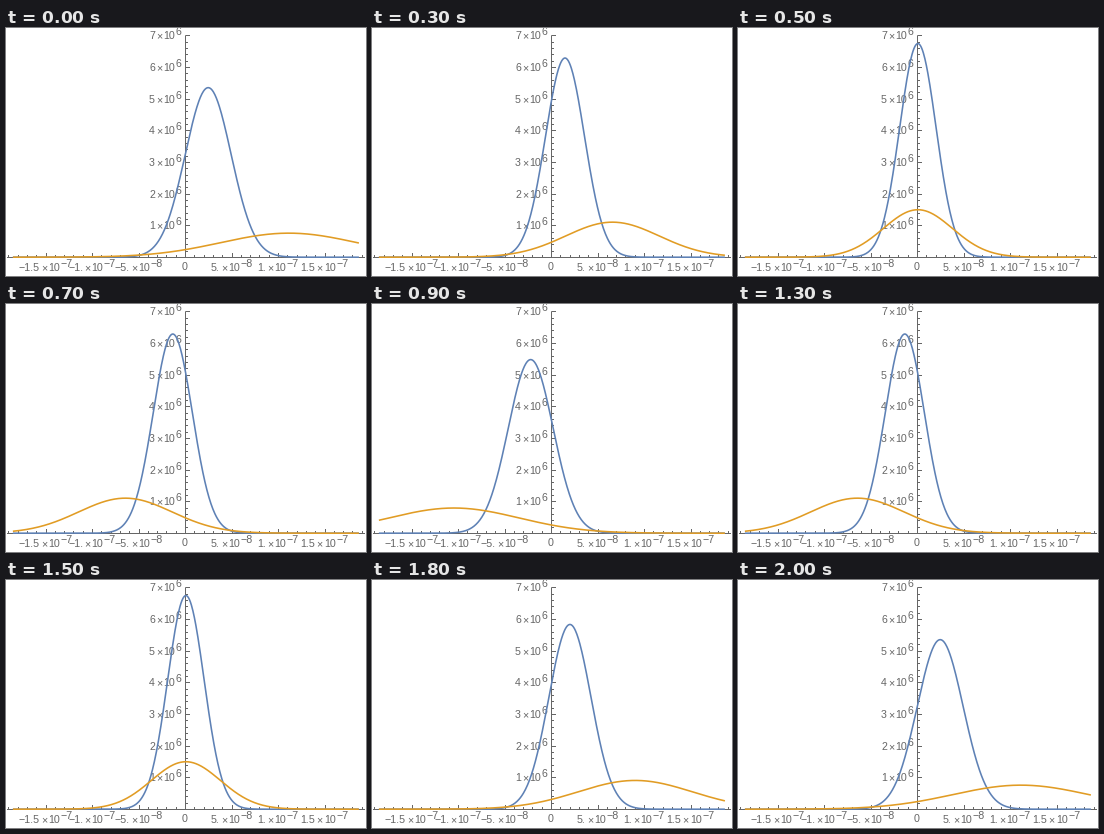
These frames come from a looping animation (360 by 248 pixels, 2.1 s). A matplotlib script:

```python
import numpy as np
import matplotlib.pyplot as plt
from matplotlib.animation import FuncAnimation

W, H, DPI = 360, 248, 100
PX = 72 / DPI                      # one pixel in points
X0, Y0 = 179.5, 229.5              # axis crossing in pixels
SX, SY = 9.3, 31.65                # pixels per 1e-8 and per 1e6
GRAY, BLUE, ORANGE = "#666666", "#5e81b5", "#e19c24"
STEPS = 20                         # steps per oscillation; both ends are shown
FONT = 10.67

fig = plt.figure(figsize=(W / DPI, H / DPI), dpi=DPI, facecolor="white")
ax = fig.add_axes([0, 0, 1, 1])
ax.set(xlim=(0, W), ylim=(H, 0))
ax.axis("off")


def line(xs, ys):
    ax.plot(xs, ys, color=GRAY, lw=PX, solid_capstyle="butt", snap=False,
            zorder=1)


def advance(s):
    em = {".": 0.278, "\u2212": 0.584, "\u00d7": 0.584}
    return FONT * sum(em.get(c, 0.556) for c in s)


def text(x, y, s):
    ax.text(x, y, s, family="Liberation Sans", size=FONT * PX, color=GRAY,
            ha="left", va="baseline", zorder=1)


def label(x, base, mantissa, power, align):
    """Scientific notation, placed by its centre (0.5) or right end (1)."""
    parts = [(mantissa, 1.2, 0), ("\u00d7", 1, 0), ("10", 0.3, 0), (power, 0, -4)]
    x -= align * sum(advance(s) + gap for s, gap, _ in parts)
    for s, gap, rise in parts:
        text(x, base + rise, s)
        x += advance(s) + gap


def draw_axes():
    line([1, 359], [Y0, Y0])
    line([X0, X0], [7.5, Y0])
    for k in range(-19, 20):
        x = np.floor(X0 + k * SX) + 0.5
        line([x, x], [Y0, Y0 - (4.5 if k % 5 == 0 else 2.5)])
    for k in range(1, 36):
        y = np.floor(Y0 - k * SY / 5) + 0.5
        line([X0, X0 + (4.5 if k % 5 == 0 else 2.5)], [y, y])
    for k in range(1, 8):
        label(175.5, np.round(Y0 - k * SY + 3.5), str(k), "6", 1)
    for mantissa, power, k in (("1.5", "7", 15), ("1.", "7", 10), ("5.", "8", 5)):
        label(X0 - 0.5 + k * SX, 243, mantissa, "\u2212" + power, 0.5)
        label(X0 - 0.5 - k * SX, 243, "\u2212" + mantissa, "\u2212" + power, 0.5)
    text(X0 - 0.5 - advance("0") / 2, 242, "0")


def packet(x, c, peak, width, swing, spread, power):
    """Swinging Gaussian of constant area that widens away from the centre."""
    grow = 1 + spread * abs(c) ** power
    return peak / grow * np.exp(-((x - swing * c) / (width * grow)) ** 2 / 2)


draw_axes()
xs = np.linspace(-173, 173, 693)
WAVES = ((BLUE, (6.75, 18.2, 22.3, 0.26, 2.4)),
         (ORANGE, (1.5, 34.5, 103, 0.974, 1.9)))
curves = [ax.plot([], [], color=color, lw=1.6 * PX, solid_capstyle="butt",
                  zorder=2)[0] for color, _ in WAVES]


def update(i):
    c = np.cos(2 * np.pi * i / STEPS)
    for curve, (_, shape) in zip(curves, WAVES):
        curve.set_data(X0 + 0.4 + xs, Y0 - 0.3 - SY * packet(xs, c, *shape))
    return curves


anim = FuncAnimation(fig, update, frames=STEPS + 1, interval=100,
                     repeat=True, repeat_delay=0, blit=False)
plt.show()
```
